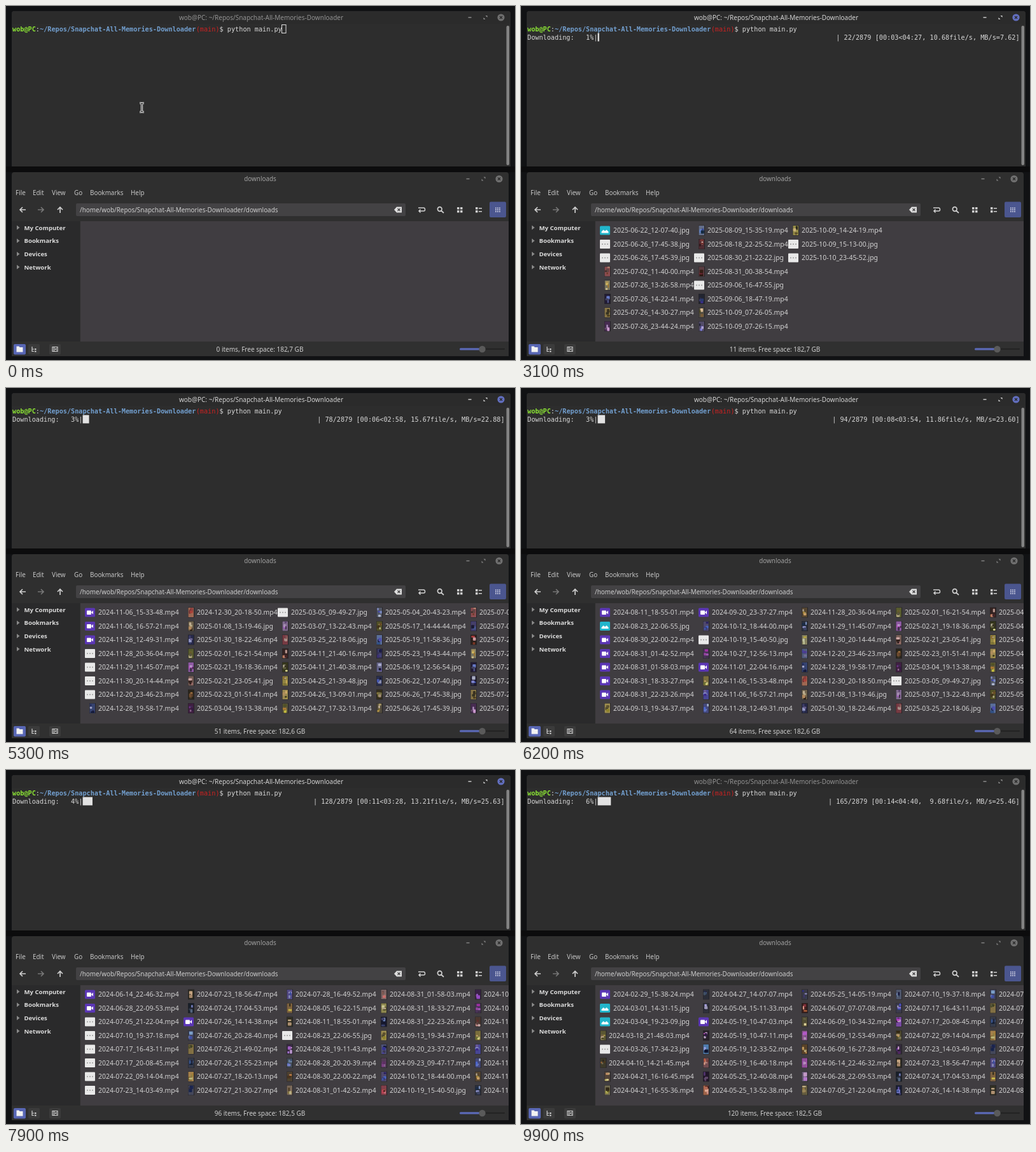
An HTML page with a canvas for the animation above (10000 ms loop, 800 by 556 pixels).

```html
<!DOCTYPE html>
<html lang="en">
<head>
<meta charset="utf-8">
<title>Downloader</title>
<style>
html, body { margin: 0; width: 100%; height: 100%; overflow: hidden; background: #111214; }
canvas { display: block; width: 800px; height: 556px; }
</style>
</head>
<body>
<canvas id="stage" width="800" height="556"></canvas>
<script>
const ctx = document.getElementById('stage').getContext('2d');
const LOOP = 10000, STEP = 100, TOTAL = 2879;
const UI = '"Noto Sans", "Open Sans", sans-serif';
const MONO = '"DejaVu Sans Mono", monospace';
const CELL = 6.143, LEFT = 10, COLS = 126;
const REPO = 'Repos/Snapchat-All-Memories-Downloader';
const USER = 'wob';

// Download progress at a few moments, interpolated in between.
const TIMES = [2100, 3100, 4400, 6200, 7300, 8600, 9900];
const COUNT = [0, 22, 61, 94, 116, 143, 165];
const ITEMS = [0, 11, 37, 64, 86, 107, 120];
const RATE = [6, 10.68, 19.48, 11.86, 12.3, 14.27, 9.68];
const SPEED = [2, 7.62, 22.16, 23.6, 25.71, 25.53, 25.46];

// Files by batch. * = preview loading, + = plain icon at the end of the batch,
// doubled = slow preview, < = tight to the left.
const BATCHES = [`
2025-06-22_12-07-40.jpg+ 2025-06-26_17-45-38.jpg* 2025-06-26_17-45-39.jpg* 2025-07-02_11-40-00.mp4
2025-07-26_13-26-58.mp4 2025-07-26_14-22-41.mp4 2025-07-26_14-30-27.mp4 2025-07-26_23-44-24.mp4
2025-08-09_15-35-19.mp4 2025-08-18_22-25-52.mp4 2025-08-30_21-22-22.jpg* 2025-08-31_00-38-54.mp4
2025-09-06_16-47-55.jpg* 2025-09-06_18-47-19.mp4 2025-10-09_07-26-05.mp4 2025-10-09_07-26-15.mp4
2025-10-09_14-24-19.mp4 2025-10-09_15-13-00.jpg* 2025-10-10_23-45-52.jpg*`, `
2025-01-08_13-19-46.jpg* 2025-01-30_18-22-46.mp4 2025-02-21_23-05-41.jpg* 2025-02-23_01-51-41.mp4
2025-03-05_09-49-27.jpg** 2025-03-07_13-22-43.mp4 2025-03-25_22-18-06.jpg* 2025-04-11_21-40-16.mp4
2025-04-11_21-40-38.mp4 2025-04-25_21-39-48.jpg* 2025-04-26_13-09-01.mp4 2025-04-27_17-32-13.mp4
2025-05-04_20-43-23.mp4 2025-05-17_14-44-44.mp4 2025-05-19_11-58-36.jpg* 2025-05-23_19-43-44.mp4
2025-06-19_12-56-54.jpg* 2025-07-06_13-50-17.mp4 2025-07-25_20-50-38.mp4 2025-07-26_14-27-47.mp4
2025-08-18_17-55-57.mp4 2025-08-18_18-18-19.mp4 2025-08-18_18-18-48.mp4 2025-08-18_18-19-10.mp4
2025-08-18_22-26-10.mp4 2025-09-05_19-12-31.mp4`, `
2024-08-11_18-55-01.mp4+ 2024-08-23_22-06-55.jpg++ 2024-08-30_22-00-22.mp4+ 2024-08-31_01-42-52.mp4+
2024-08-31_01-58-03.mp4+ 2024-08-31_18-33-27.mp4+ 2024-08-31_22-23-26.mp4+ 2024-09-13_19-34-37.mp4
2024-09-20_23-37-27.mp4+ 2024-10-12_18-44-00.mp4 2024-10-19_15-40-50.jpg* 2024-10-27_12-56-13.mp4
2024-11-01_22-04-16.mp4+ 2024-11-06_15-33-48.mp4 2024-11-06_16-57-21.mp4 2024-11-28_12-49-31.mp4
2024-11-28_20-36-04.mp4 2024-11-29_11-45-07.mp4 2024-11-30_20-14-44.mp4 2024-12-20_23-46-23.mp4
2024-12-28_19-58-17.mp4 2024-12-30_20-18-50.mp4 2025-02-01_16-21-54.mp4 2025-02-21_19-18-36.mp4
2025-03-04_19-13-38.mp4`, `
2024-07-22_09-14-04.mp4+ 2024-07-23_14-03-49.mp4+ 2024-07-23_18-56-47.mp4* 2024-07-24_17-04-53.mp4*
2024-07-26_20-28-40.mp4 2024-07-26_21-49-02.mp4 2024-07-26_21-55-23.mp4 2024-07-27_18-20-13.mp4
2024-07-27_21-30-27.mp4 2024-07-28_16-49-52.mp4* 2024-08-05_16-22-15.mp4 2024-08-28_19-11-43.mp4
2024-08-28_20-20-39.mp4 2024-09-23_09-47-17.mp4 2024-10-19_18-04-19.mp4 2024-12-24_18-20-33.mp4`, `
2024-05-19_10-47-11.mp4+ 2024-05-19_12-33-52.mp4+ 2024-05-19_16-40-18.mp4+ 2024-05-25_12-40-08.mp4
2024-05-25_13-52-38.mp4 2024-05-25_14-05-19.mp4 2024-06-07_07-07-08.mp4 2024-06-09_10-34-32.mp4*
2024-06-09_12-53-49.mp4* 2024-06-09_16-27-28.mp4* 2024-06-14_22-46-32.mp4* 2024-06-28_22-09-53.mp4*
2024-07-05_21-22-04.mp4* 2024-07-10_19-37-18.mp4* 2024-07-17_16-43-11.mp4 2024-07-17_20-08-45.mp4
2024-07-26_14-14-38.mp4+`, `
2024-02-29_15-38-24.mp4+ 2024-03-01_14-31-15.jpg+ 2024-03-04_19-23-09.jpg+ 2024-03-18_21-48-03.mp4<
2024-03-26_17-34-23.jpg* 2024-04-10_14-21-45.mp4< 2024-04-21_16-16-45.mp4 2024-04-21_16-55-36.mp4
2024-04-27_14-07-07.mp4 2024-05-04_15-11-33.mp4 2024-05-19_10-47-03.mp4+`];

const files = BATCHES.flatMap((batch, b) => {
  const words = batch.trim().split(/\s+/), start = TIMES[b], end = TIMES[b + 1];
  return words.map((word, i) => {
    const [, name, mark] = word.match(/^(.*?)([*+<]*)$/);
    const born = start + (end - start) * (words.length - i) / words.length;
    const slow = mark.length > 1;
    let loading = Math.min(born + 200, end), ready = Math.min(born + 500, end);
    if (mark[0] === '*') ready = end + (slow ? 2000 : 500);
    if (mark[0] === '+') { loading = end + 400; ready = end + (slow ? 2000 : 900); }
    return { name, born, loading, ready, shift: mark === '<' ? -7 : 0, video: name.endsWith('mp4') };
  });
}).sort((a, b) => a.name < b.name ? -1 : 1);

const clamp = v => v < 0 ? 0 : v > 1 ? 1 : v;

function at(values, t) {
  let i = 1;
  while (i < TIMES.length - 1 && t > TIMES[i]) i++;
  const k = clamp((t - TIMES[i - 1]) / (TIMES[i] - TIMES[i - 1]));
  return values[i - 1] + (values[i] - values[i - 1]) * k;
}

function box(x, y, w, h, color, r = 0) {
  ctx.fillStyle = color;
  ctx.beginPath();
  ctx.roundRect(x, y, w, h, r);
  ctx.fill();
}

function disc(x, y, r, color) {
  ctx.fillStyle = color;
  ctx.beginPath();
  ctx.arc(x, y, r, 0, 7);
  ctx.fill();
}

function path(d, x, y, color, width = 1.5) {
  ctx.save();
  ctx.translate(x, y);
  ctx.strokeStyle = ctx.fillStyle = color;
  ctx.lineWidth = width;
  width ? ctx.stroke(new Path2D(d)) : ctx.fill(new Path2D(d));
  ctx.restore();
}

function text(s, x, y, color, font, align = 'left') {
  ctx.font = font;
  ctx.fillStyle = color;
  ctx.textAlign = align;
  ctx.fillText(s, x, y);
}

const ui = (s, x, y, color, align, size = 9.9, weight = 400) =>
  text(s, x, y, color, `${weight} ${size}px ${UI}`, align);

const mono = (s, col, row, color, weight = 400) =>
  text(s, LEFT + col * CELL, 39.5 + row * 13, color, `${weight} 10.2px ${MONO}`);

function windowButtons(x, y, ink, fill) {
  path('M-2.5 0H2.5', x, y, ink, 1.4);
  path('M0 -3H3V0ZM0 3H-3V0Z', x + 24.5, y, ink, 0);
  disc(x + 49, y, 5.6, fill);
  path('M-2 -2L2 2M2 -2L-2 2', x + 49, y, '#292929', 1.3);
}

function terminalTitle(ink, fill) {
  ui(`${USER}@PC: ~/${REPO}`, 401, 22, ink, 'center', 10);
  windowButtons(729, 18, ink, fill);
}

const clock = s => [s / 60, s % 60].map(v => String(Math.floor(v)).padStart(2, '0')).join(':');

function progress(t) {
  const n = Math.round(at(COUNT, t)), rate = at(RATE, t);
  const left = `Downloading: ${String(Math.round(n / TOTAL * 100)).padStart(3)}%|`;
  const spent = clock((t - 1100) * 0.00165);
  const stats = n
    ? `[${spent}<${clock((TOTAL - n) / rate)}, ${rate.toFixed(2).padStart(5)}file/s, MB/s=${at(SPEED, t).toFixed(2)}]`
    : '[00:00<?, ?file/s]';
  const right = `| ${n}/${TOTAL} ${stats}`;
  const room = COLS - left.length - right.length;
  mono(left, 0, 1, '#d8d8d8');
  mono(right, COLS - right.length, 1, '#d8d8d8');
  const eighths = Math.floor(room * n / TOTAL * 8);
  box(LEFT + left.length * CELL, 42.5, eighths * CELL / 8, 13, '#e2e2e2');
}

function terminal(t) {
  box(9, 8, 784, 244, '#2d2d2d', [4, 4, 0, 0]);
  box(9, 8, 784, 20, '#2b2b2b', [4, 4, 0, 0]);
  const focus = clamp(Math.min(t, 9900 - t) / 200);
  ctx.globalAlpha = 1 - focus;
  terminalTitle('#929292', '#6f6f6f');
  ctx.globalAlpha = focus;
  terminalTitle('#d4d4d4', '#626fc0');
  ctx.globalAlpha = 1;
  box(786.5, 31, 4.5, 219, '#838383', 2);

  let col = 0;
  const prompt = [[`${USER}@PC`, '#8ae234', 700], [':', '#d8d8d8', 400], [`~/${REPO}`, '#729fcf', 700],
    ['(main)', '#cc2222', 400], ['$ python main.py', '#d8d8d8', 400]];
  for (const [s, color, weight] of prompt) {
    mono(s, col, 0, color, weight);
    col += s.length;
  }

  if (t < 100) {
    ctx.strokeStyle = '#e0e0e0';
    ctx.lineWidth = 1;
    ctx.strokeRect(433.5, 29.5, 6.5, 13);
  } else if (t < 400) box(433.5, 29.5, 6.2, 13, '#e2e2e2');
  else if (t >= 600 && t < 900) box(LEFT, 42.5, 6.2, 13, '#e2e2e2');

  if (t < 600) {
    const beam = 'M-3.5 -7H-1L0 -6L1 -7H3.5M0 -6V6M-3.5 7H-1L0 6L1 7H3.5';
    path(beam, 213.5, 159.5, '#f0f0f0', 3.2);
    path(beam, 213.5, 159.5, '#252525', 1.1);
  }
  if (t >= TIMES[0]) progress(t);
}

function preview(name, x, y) {
  let seed = 7;
  for (const c of name) seed = (seed * 31 + c.charCodeAt(0)) % 65521;
  const rnd = () => (seed = (seed * 171 + 11213) % 53125) / 53125;
  const hue = [225, 350, 25, 270, 35, 210][Math.floor(rnd() * 6)];
  const tone = (s, l) => `hsl(${hue + rnd() * 30} ${s}% ${l}%)`;
  box(x - 0.5, y - 8, 10, 16, '#242326');
  box(x, y - 7.5, 8.5, 15, tone(10 + rnd() * 28, 12 + rnd() * 38));
  for (let i = 0; i < 4; i++) {
    const w = 2 + rnd() * 4, h = 2 + rnd() * 4;
    box(x + rnd() * (8.5 - w), y - 7.5 + rnd() * (15 - h), w, h, tone(15 + rnd() * 40, 10 + rnd() * 65), 1);
  }
}

function icon(file, t, x, y) {
  if (t >= file.ready) return preview(file.name, x - 13.5 + (file.shift ? 0.5 : 0), y);
  x -= 21;
  if (t >= file.loading) {
    box(x, y - 7, 16, 14, '#e9e9e9', 1);
    for (let i = 0; i < 3; i++) disc(x + 4 + i * 4, y, 1, '#9a9a9a');
  } else if (file.video) {
    box(x, y - 7, 16, 14, '#5b36b5', 1.5);
    box(x + 3, y - 3, 7, 6.5, '#fff', 1);
    path('M10 0L13 -3V3Z', x, y, '#fff', 0);
  } else {
    box(x, y - 7, 16, 14, '#22b5cb', 1.5);
    path('M2.5 4V2L5.5 -1L8 1L10.5 -1L13.5 2V4Z', x, y, '#fff', 0);
  }
}

function listing(t) {
  const shown = files.filter(f => f.born <= t).slice(0, 40);
  ctx.save();
  ctx.beginPath();
  ctx.rect(117, 338, 673, 189);
  ctx.clip();
  for (let i = 0, x = 145; i < shown.length; i += 8) {
    const column = shown.slice(i, i + 8);
    column.forEach((f, row) => {
      const y = 352.5 + row * 21.5;
      icon(f, t, x + f.shift, y);
      ui(f.name, x + f.shift, y + 3.6, '#d2d2d2', 'left', 10.45);
    });
    x += column.some(f => f.video && t < f.ready) ? 155 : 148;
  }
  ctx.restore();
}

function toolbar() {
  const ink = '#d0d0d0';
  path('M5 0H-4M0 -4L-4 0L0 4', 26, 320, ink, 1.7);
  path('M-5 0H4M0 -4L4 0L0 4', 55, 320, '#777', 1.7);
  path('M0 5V-4M-4 0L0 -4L4 0', 85, 320, ink, 1.7);
  box(110, 310, 518, 20, '#434244', 2);
  ui(`/home/${USER}/${REPO}/downloads`, 116, 323.6, '#cfcfcf');
  path('M-6 0L-2 -4.5H6V4.5H-2Z', 616, 320, '#dedede', 0);
  path('M-0.5 -2L3.5 2M3.5 -2L-0.5 2', 616, 320, '#434244', 1.3);
  path('M-5 -3H3.5Q5.5 -3 5.5 0Q5.5 2 3.5 2H-4M-1.5 -0.5L-4 2L-1.5 4.5', 653, 320, ink, 1.5);
  path('M2 -1A3.3 3.3 0 1 1 -4.6 -1A3.3 3.3 0 1 1 2 -1M1 1.5L5 5', 683, 320, ink, 1.7);
  for (const dx of [-4, 1]) for (const dy of [-4, 1]) box(713 + dx, 320 + dy, 3.5, 3.5, ink);
  for (const dy of [-4, 1]) {
    box(738, 320 + dy, 3.5, 3.5, ink);
    box(743, 321 + dy, 5, 1.5, ink);
  }
  box(760, 307.5, 26, 24.5, '#4b568f', 2);
  for (let i = 0; i < 9; i++) box(769 + i % 3 * 3, 316.5 + Math.floor(i / 3) * 2.8, 1.8, 1.7, '#c9cce0');
}

function statusBar(t) {
  const free = t < 5300 ? '182,7' : t < 6800 ? '182,6' : '182,5';
  box(9, 527, 781, 23, '#303030');
  box(12, 531, 19, 16.5, '#5866b4', 2);
  path('M-5 -4.5H-1L0 -3H5V4.5H-5Z', 21.5, 539, '#f2f2f2', 0);
  box(35, 531, 18, 16.5, '#3b3b3b', 2);
  path('M-3 -4V3.5H0M-3 0H0', 44, 539, '#d0d0d0', 1.2);
  box(45, 538, 2.5, 2, '#d0d0d0');
  box(45, 541.5, 2.5, 2, '#d0d0d0');
  box(68, 531, 18, 16.5, '#3b3b3b', 2);
  path('M-4 -3.5H4V3.5H-4ZM-1.5 -3.5V3.5M2.5 -1.5L0.5 0L2.5 1.5', 77, 539, '#d0d0d0', 1.2);
  ui(`${Math.round(at(ITEMS, t))} items, Free space: ${free} GB`, 399, 543, '#cfcfcf', 'center', 10);
  box(713, 537.3, 32, 3.2, '#5b69b7', 1.5);
  box(752, 537.8, 32, 2, '#222', 1);
  disc(748.5, 539, 5.2, '#5a5a5a');
}

function fileManager(t) {
  box(9, 261, 781, 289, '#2f2f2f', [4, 4, 0, 0]);
  ui('downloads', 399.5, 275.3, '#a2a2a2', 'center');
  windowButtons(726, 271.5, '#858585', '#707070');
  [['File', 15], ['Edit', 42], ['View', 72], ['Go', 107], ['Bookmarks', 132], ['Help', 196]]
    .forEach(([s, x]) => ui(s, x, 296.8, '#c6c6c6'));
  toolbar();
  box(9, 338, 107, 189, '#2a2a2b');
  box(117, 338, 673, 189, '#403d41');
  ['My Computer', 'Bookmarks', 'Devices', 'Network'].forEach((s, i) => {
    const y = 348 + i * 20.7;
    path('M-2 -3.5L2.5 0L-2 3.5Z', 19, y, '#8a8a8a', 0);
    ui(s, 28.5, y + 3.6, '#dcdcdc', 'left', 9.6, 700);
  });
  listing(t);
  statusBar(t);
}

function frame(now) {
  const t = Math.floor(now % LOOP / STEP) * STEP;
  box(0, 0, 800, 556, '#111214');
  box(0, 252, 800, 9, '#0c0c0d');
  terminal(t);
  fileManager(t);
  requestAnimationFrame(frame);
}
frame(0);
</script>
</body>
</html>
```
